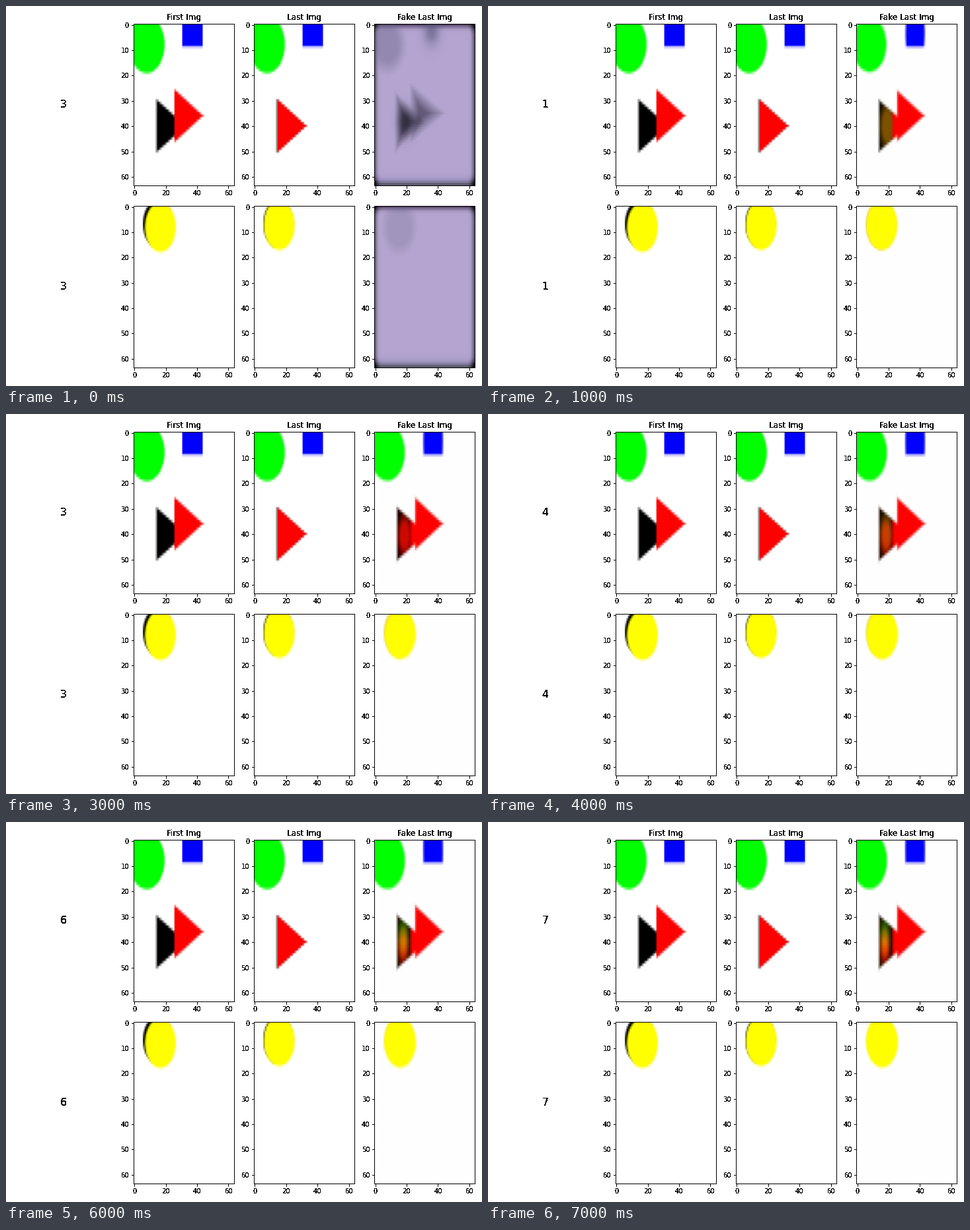
Animation, 720 px wide and 576 px high, one loop 8 s. Source, as a matplotlib script:

```python
import matplotlib.pyplot as plt
import numpy as np
from matplotlib.animation import FuncAnimation

W, H, DPI = 720, 576, 72
N = 64
EPOCHS = range(8)

GREEN, BLUE, RED = (0, 255, 0), (0, 0, 255), (255, 0, 0)
YELLOW, BLACK = (255, 255, 0), (0, 0, 0)

# Pixel centres on the 64 x 64 grid
X, Y = np.meshgrid(np.arange(N) + 0.5, np.arange(N) + 0.5)


def canvas(color=(255, 255, 255)):
    return np.ones((N, N, 3)) * np.array(color, float)


def paint(img, mask, color):
    img += mask[..., None] * (np.array(color, float) - img)


def ellipse(cx, cy, rx, ry=None, soft=1.0):
    ry = ry or rx
    r = np.hypot((X - cx) / rx, (Y - cy) / ry)
    return np.clip(0.5 + (1 - r) * min(rx, ry) / soft, 0, 1)


def box(x0, y0, x1, y1, soft=1.0):
    d = np.minimum.reduce([X - x0, x1 - X, Y - y0, y1 - Y])
    return np.clip(0.5 + d / soft, 0, 1)


def arrow(left, cy, width, half, soft=1.0):
    """Triangle with an upright left side, pointing right."""
    slant = np.hypot(width, half)
    d = ((left + width - X) * half - np.abs(Y - cy) * width) / slant
    return np.clip(0.5 + np.minimum(X - left, d) / soft, 0, 1)


def glow(cx, cy, sx, sy):
    return np.exp(-((X - cx) / sx) ** 2 - ((Y - cy) / sy) ** 2)


def fade(distance, reach):
    return np.exp(-(distance / reach) ** 2)


def scene(red_x, red_y):
    """Disc, square, and a red triangle over its black trace."""
    img = canvas()
    paint(img, ellipse(8.4, 8.4, 11.3), GREEN)
    paint(img, box(31, -3, 44, 9.2), BLUE)
    paint(img, arrow(14.6, 40.5, 18.4, 10.4), BLACK)
    paint(img, arrow(red_x, red_y, 18.2, 10.4), RED)
    return img


def disc(cx, cy):
    img = canvas()
    paint(img, ellipse(15.6, 7.4, 9.6), BLACK)
    paint(img, ellipse(cx, cy, 9.8), YELLOW)
    return img


def haze():
    """Lilac field with dark borders."""
    img = canvas((179, 165, 207))
    sides, below = np.minimum(X, N - X), N - Y
    paint(img, 0.4 * fade(below, 3), (125, 120, 185))
    paint(img, 0.7 * fade(sides, 1.7), (62, 50, 72))
    paint(img, 0.85 * fade(Y, 1.6), (48, 30, 62))
    paint(img, 0.75 * fade(below, 1.5), (60, 66, 66))
    paint(img, 0.9 * fade(np.hypot(sides, np.minimum(Y, below)), 2.4), BLACK)
    return img


def hazy_scene():
    img = haze()
    paint(img, 0.4 * ellipse(8.4, 8.4, 9.5, soft=6), (100, 95, 130))
    paint(img, 0.6 * glow(36.5, 3, 5, 5.5), (85, 82, 118))
    paint(img, 0.75 * arrow(25.5, 35.5, 14, 7.5, soft=6), (72, 64, 92))
    paint(img, 0.75 * arrow(15.5, 39, 13, 8, soft=5), (45, 40, 60))
    paint(img, 0.5 * glow(20, 39, 4.5, 5), (25, 22, 35))
    return img


def hazy_disc():
    img = haze()
    paint(img, 0.25 * ellipse(16, 8.5, 9.5, soft=5), (110, 100, 135))
    return img


def core_color(k):
    """Red and green level inside the dark triangle."""
    keys = [1, 2, 3, 5, 7]
    return (np.interp(k, keys, [125, 20, 205, 190, 225]),
            np.interp(k, keys, [80, 72, 10, 115, 115]))


def fake_scene(k):
    """The rebuilt scene sharpens as k grows, while its core narrows."""
    blur, age = 0.5 / k, k - 1
    img = canvas((254, 254, 254))
    paint(img, ellipse(8.4, 8.4, 11.3 - blur, soft=1.4), GREEN)
    square = box(31.2 + blur / 2, -3, 43.8 - blur / 3, 9.2, 1.3)
    paint(img, square * ellipse(37.5, 4, 6.8, 8 + 2 * k, soft=1.6), BLUE)

    # The red and green parts of the core drift apart
    dark = canvas(BLACK)
    cx, rx, drift = 20 - 0.3 * age, 4.5 - 0.3 * age, 0.35 * age
    for channel, level in enumerate(core_color(k)):
        cy = 40.5 + (drift if channel == 0 else -drift)
        blob = ellipse(cx, cy, rx, 8 - drift, soft=3)
        dark[..., channel] = level * (0.15 + 0.85 * blob)
    paint(dark, np.clip((X - 22.4) / 1.6, 0, 1), RED)

    body = arrow(14.6, 40.5, 18.6, 10.5 - blur, soft=1.3)
    img += body[..., None] * (dark - img)
    paint(img, arrow(26.1, 36.5, 17.6 - blur, 10.3 - blur, 1.3), RED)
    return img


def fake_disc(k):
    t = (k - 1) / 6
    img = canvas((254, 254, 254))
    rim = (228 + 24 * t, 180 + 70 * t, 60 * (1 - t))
    paint(img, ellipse(15.9, 7.7, 9.7, soft=1.3), rim)
    paint(img, ellipse(16.7 - 0.4 / k, 8.5 - 0.7 / k, 9.8, soft=1.6), YELLOW)
    return img


def to_rgb(img):
    return np.clip(np.rint(img), 0, 255).astype(np.uint8)


def harden(img, dpi):
    """Turn smooth black edges into solid pixels."""
    out = np.zeros_like(img)
    out[..., 3] = img[..., 3] > 0.25
    return out, 0, 0


def fake_pair(k):
    if k == 0:
        return to_rgb(hazy_scene()), to_rgb(hazy_disc())
    return to_rgb(fake_scene(k)), to_rgb(fake_disc(k))


plt.rcParams.update({"font.family": "DejaVu Sans", "font.size": 10})
fig, axes = plt.subplots(2, 4, figsize=(W / DPI, H / DPI), dpi=DPI,
                         facecolor="white")

fakes = [fake_pair(k) for k in EPOCHS]
stills = [(scene(26, 36.5), scene(15, 40.5)),
          (disc(17.1, 8.6), disc(16.1, 7.8))]
titles = ["First Img", "Last Img", "Fake Last Img"]


def panel(ax, img):
    view = ax.imshow(img, aspect="auto")
    ax.set_xticks(range(0, 61, 20))
    ax.set_yticks(range(0, 61, 10))
    for part in (ax.xaxis, ax.yaxis, ax.title, *ax.spines.values()):
        part.set_agg_filter(harden)
    return view


views, numbers = [], []
for row, (first, last) in enumerate(stills):
    label_ax, *image_axes = axes[row]
    label_ax.axis("off")
    numbers.append(label_ax.text(0.5, 0.5, "3", fontsize=16, ha="center",
                                 va="center", agg_filter=harden))
    images = [to_rgb(first), to_rgb(last), fakes[0][row]]
    views.append([panel(ax, im) for ax, im in zip(image_axes, images)][-1])
for ax, title in zip(axes[0, 1:], titles):
    ax.set_title(title, fontsize=12)
fig.tight_layout()


def update(k):
    for view, number, img in zip(views, numbers, fakes[k]):
        view.set_data(img)
        number.set_text(str(k or 3))
    return views + numbers


anim = FuncAnimation(fig, update, frames=len(EPOCHS), interval=1000,
                     repeat=True, repeat_delay=0, blit=False)
plt.show()
```
